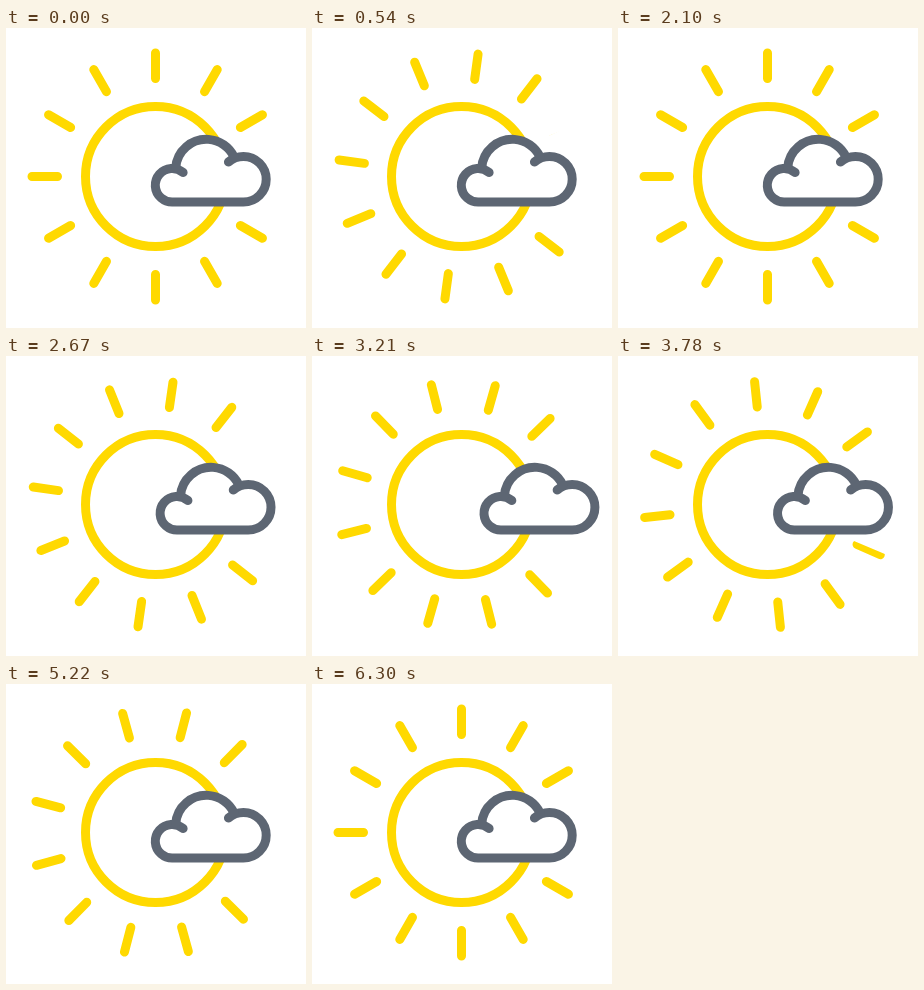
Animation of 300x300 px, one loop 6.33 s. Source, as an HTML page with a canvas:

```html
<!DOCTYPE html>
<html lang="en">
<head>
<meta charset="utf-8">
<title>Sun and cloud</title>
<style>
  html, body { margin: 0; width: 100%; height: 100%; overflow: hidden; background: #fff; }
  canvas { display: block; width: 300px; height: 300px; }
</style>
</head>
<body>
<canvas id="sky" width="300" height="300"></canvas>
<script>
const LOOP = 6330, STEP = 30;
const SUN = '#ffd900', CLOUD = '#5d6673';
const CX = 149.5, CY = 148.5;
const RAD = Math.PI / 180;

const ctx = document.getElementById('sky').getContext('2d');

// Cloud drift: [step, x offset]
const drift = [[0, 0], [81, 0], [108, 22.8], [147, -5.6], [168, 0], [211, 0]];

// Lobes: centre x, centre y, radius
const leftLobe = [166.1, 157.2, 16.8];
const topLobe = [200.3, 142, 30.7];
const rightLobe = [237.4, 151.2, 22.8];

function smooth(s) {
  return s * s * (3 - 2 * s);
}

function track(keys, n) {
  for (let i = 1; i < keys.length; i++) {
    const [n0, v0] = keys[i - 1], [n1, v1] = keys[i];
    if (n <= n1) return v0 + (v1 - v0) * smooth((n - n0) / (n1 - n0));
  }
  return keys[keys.length - 1][1];
}

function pen(color, width) {
  ctx.strokeStyle = color;
  ctx.lineWidth = width;
  ctx.lineCap = 'round';
  ctx.lineJoin = 'round';
}

function arc([x, y, r], from, to, ccw) {
  ctx.arc(x, y, r, from * RAD, to * RAD, ccw);
}

// Ray angles run clockwise from the top
function drawRays(turn) {
  ctx.save();
  ctx.translate(CX, CY);
  // Rays stay hidden in the wedge behind the cloud
  ctx.beginPath();
  ctx.moveTo(0, 0);
  arc([0, 0, 220], 22.9, 335);
  ctx.closePath();
  ctx.clip();
  pen(SUN, 9);
  ctx.beginPath();
  for (let i = 0; i < 12; i++) {
    const a = (i * 30 + turn) * RAD;
    const x = Math.sin(a), y = -Math.cos(a);
    ctx.moveTo(x * 98, y * 98);
    ctx.lineTo(x * 123.5, y * 123.5);
  }
  ctx.stroke();
  ctx.restore();
}

function drawDisc() {
  pen(SUN, 9);
  ctx.beginPath();
  arc([CX, CY, 70], 0, 360);
  ctx.stroke();
}

function drawCloud(dx) {
  ctx.save();
  ctx.translate(dx, 0);

  // White body; the top lobe is filled only down to its chord
  ctx.fillStyle = '#fff';
  for (const lobe of [leftLobe, rightLobe]) {
    ctx.beginPath();
    arc(lobe, 0, 360);
    ctx.fill();
  }
  ctx.beginPath();
  arc(topLobe, 180, 360);
  ctx.fill();
  ctx.fillRect(leftLobe[0], 141, rightLobe[0] - leftLobe[0], 33);

  pen(CLOUD, 9);
  ctx.beginPath();
  arc(leftLobe, -49, -270, true);
  arc(rightLobe, 90, -131, true);
  ctx.stroke();
  ctx.beginPath();
  arc(topLobe, -176, -25);
  ctx.stroke();
  ctx.restore();
}

function draw(n) {
  ctx.fillStyle = '#fff';
  ctx.fillRect(0, 0, 300, 300);
  drawRays(n * 90 / 210);
  drawDisc();
  drawCloud(track(drift, n));
}

const start = performance.now();
function tick() {
  const t = (performance.now() - start) % LOOP;
  draw(Math.floor(t / STEP));
  requestAnimationFrame(tick);
}
tick();
</script>
</body>
</html>
```
